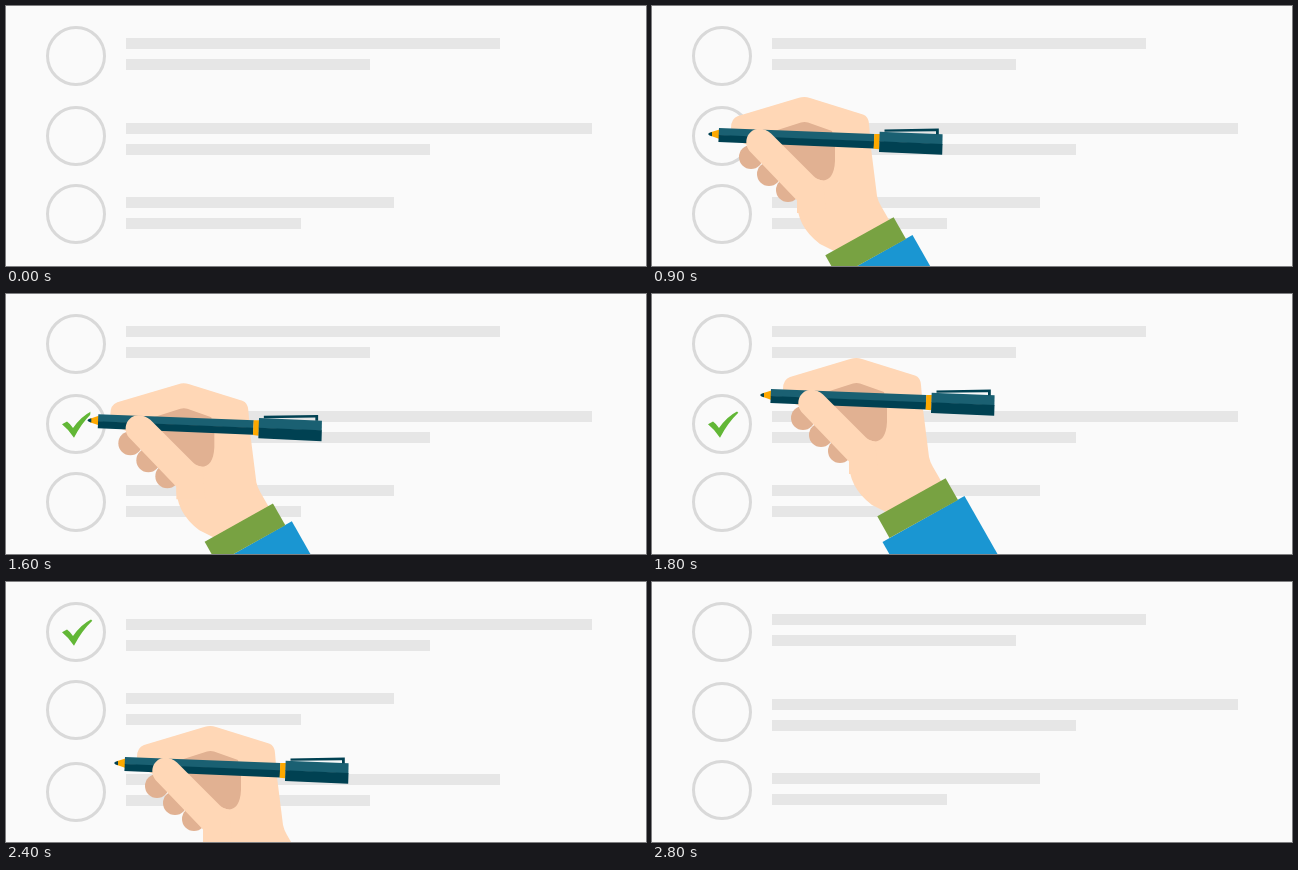
An HTML page with a canvas for the animation above (2.9 s loop, 640 by 260 pixels).

```html
<!DOCTYPE html>
<html lang="en">
<head>
<meta charset="utf-8">
<title>Checklist</title>
<style>
html, body { margin: 0; width: 100%; height: 100%; overflow: hidden; background: #fafafa; }
canvas { display: block; width: 640px; height: 260px; }
</style>
</head>
<body>
<canvas id="stage" width="640" height="260"></canvas>
<script>
const ctx = document.getElementById('stage').getContext('2d');
const LOOP = 2900, STEP = 100, PERIOD = 240;
const SKIN = '#ffd7b6', SHADE = '#e1b192', TEAL = '#1a6072', NAVY = '#004152', ORANGE = '#fda800';

// ring centre, first bar top, bar right ends
const rows = [[50, 32, 494, 364], [130, 117, 586, 424], [208, 191, 388, 295]];

// step, hand x, hand y
const keys = [[4, -12, 197], [9, -52, 27], [13, -52, 27], [14, -45, 32], [15, -40, 38],
              [18, 0, 0], [22, 0, 0], [28, 0, 240]];

function handAt(n) {
  if (n <= keys[0][0]) return keys[0].slice(1);
  const i = keys.findIndex(k => k[0] >= n);
  const a = keys[i - 1], b = keys[i], p = (n - a[0]) / (b[0] - a[0]);
  return [a[1] + (b[1] - a[1]) * p, a[2] + (b[2] - a[2]) * p];
}

function fill(color, d) {
  ctx.fillStyle = color;
  ctx.fill(new Path2D(d));
}

function disc(color, x, y, r) {
  ctx.fillStyle = color;
  ctx.beginPath();
  ctx.arc(x, y, r, 0, Math.PI * 2);
  ctx.fill();
}

function drawRow([cy, top, end1, end2], dy) {
  ctx.strokeStyle = '#d9d9d9';
  ctx.lineWidth = 3;
  ctx.beginPath();
  ctx.arc(70, cy + dy, 28.5, 0, Math.PI * 2);
  ctx.stroke();
  ctx.fillStyle = '#e6e6e6';
  ctx.fillRect(120, top + dy, end1 - 120, 11);
  ctx.fillRect(120, top + 21 + dy, end2 - 120, 11);
}

function drawCheck(limit, dy) {
  ctx.save();
  ctx.beginPath();
  ctx.rect(0, 0, limit, 260);
  ctx.clip();
  ctx.translate(0, dy);
  fill('#62b736', 'M56 130.3 L61 127.5 Q64.5 130 67 134 Q75 122.5 85 117.5 L86.3 118.8 Q76 128.5 68 143.7 Q63 136 56 130.3Z');
  ctx.restore();
}

function drawPen() {
  fill(ORANGE, 'M110.5 99.3 L119.5 96.5 V106 L110.5 102.8Z');
  fill(NAVY, 'M108 101 Q109 99.3 112 99 V103.2 Q109 102.8 108 101Z');
  fill(TEAL, 'M119 95 L274.5 101 L274 109 L118.7 102.5Z');
  fill(NAVY, 'M118.8 102 L274.2 108.3 L273.8 115.5 L118.4 109Z');
  fill(ORANGE, 'M274.3 101 L280 101 L279.2 116.3 L273.6 115.7Z');
  fill(TEAL, 'M279.7 98.7 L342.6 101.3 L342.4 111.5 L279.3 108.8Z');
  fill(NAVY, 'M279.4 108.3 L342.5 111 L342.2 121.8 L279 119Z');
  fill(NAVY, 'M284.5 96.4 L338.8 95.6 V101.5 L336 101.3 V98.2 L284.5 98.8Z');
}

function drawHand(x, y) {
  ctx.save();
  ctx.translate(x, y);
  fill('#1a96d2', 'M230.5 248 L312.5 202 L395 347 L313 393Z');
  fill(SKIN, 'M131 95 Q131 85.5 138 83 L199 64.8 Q204.5 63 210 65 L263 81.5 Q268.5 83.5 269 91 L271 115 L277 163 Q278 168 281 173 L300 206 L248 224 Q233 218 220 211 Q196 193 197 166 L165 120 L134 106Z');
  fill('#78a242', 'M225.3 222.3 L293.6 184.2 L306 206 L237.5 244Z');
  disc(SHADE, 151, 124, 12);
  disc(SHADE, 169, 141, 12);
  disc(SHADE, 188, 157, 12);
  fill(SHADE, 'M165 101 L201 89.5 Q204.5 88.3 208 89.5 L232 98 L235 114 V128 Q234 147.5 222 147.5 L214 145Z');
  drawPen();
  fill(SKIN, 'M149.5 118 C142 108 149 95.8 159 95.8 Q166 95.8 171 100.5 L214 143.5 Q217.5 147 223 147.4 L226 180 L197 180 V167.5Z');
  ctx.restore();
}

function draw(now) {
  const n = Math.floor((now % LOOP) / STEP);
  const scroll = Math.max(0, n - 22) * 40;
  const [x, y] = handAt(n);
  ctx.fillStyle = '#fafafa';
  ctx.fillRect(0, 0, 640, 260);
  for (const dy of [-scroll, PERIOD - scroll]) rows.forEach(row => drawRow(row, dy));
  if (n >= 14) drawCheck(111 + x, -scroll);
  drawHand(x, y);
}

let start;
function tick(now) {
  start ??= now;
  draw(now - start);
  requestAnimationFrame(tick);
}
draw(0);
requestAnimationFrame(tick);
</script>
</body>
</html>
```
